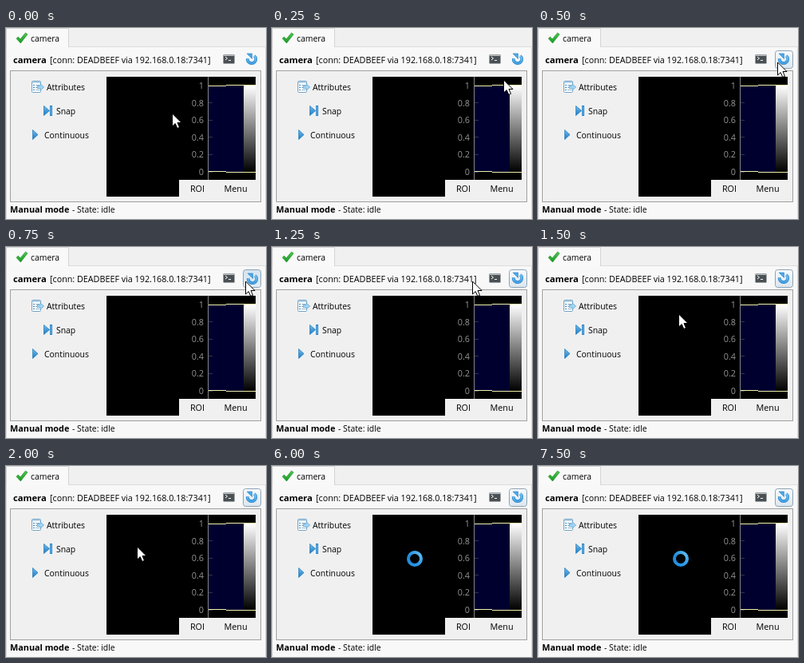
Animation, 326 px wide and 239 px high, one loop 8 s. Source, as an HTML page with a canvas:

```html
<!DOCTYPE html>
<html lang="en">
<head>
<meta charset="utf-8">
<title>Camera panel</title>
<style>
html, body { margin: 0; width: 100%; height: 100%; overflow: hidden; background: #f0f0f0; }
canvas { display: block; width: 326px; height: 239px; }
</style>
</head>
<body>
<canvas id="stage" width="326" height="239"></canvas>
<script>
const ctx = document.getElementById('stage').getContext('2d');
const LOOP = 8000;
const FONT = '"Open Sans", "Noto Sans", sans-serif';
const LABEL = { size: 10.4 };

// [start in ms, tip x, tip y]
const cursorStops = [
  [0, 208, 107], [250, 290, 65], [500, 300, 43], [1250, 251, 43],
  [1500, 176, 84], [1750, 165, 100], [2000, 164, 101]
];
const HOVER_AT = 500, PRESS_AT = 750, RELEASE_AT = 1250, BUSY_AT = 6000;

function rect(x, y, w, h, fill) {
  ctx.fillStyle = fill;
  ctx.fillRect(x, y, w, h);
}

function text(str, x, y, { size = 10.85, weight = 400, color = '#000', align = 'left' } = {}) {
  ctx.font = `${weight} ${size}px ${FONT}`;
  ctx.fillStyle = color;
  ctx.textAlign = align;
  ctx.fillText(str, x, y);
}

function path(points, { fill, stroke, width = 1, close = true } = {}) {
  ctx.beginPath();
  points.forEach(([x, y], i) => i ? ctx.lineTo(x, y) : ctx.moveTo(x, y));
  if (close) ctx.closePath();
  if (fill) { ctx.fillStyle = fill; ctx.fill(); }
  if (stroke) { ctx.strokeStyle = stroke; ctx.lineWidth = width; ctx.stroke(); }
}

function vertical(y0, y1, ...colors) {
  const g = ctx.createLinearGradient(0, y0, 0, y1);
  colors.forEach((c, i) => g.addColorStop(i / (colors.length - 1), c));
  return g;
}

function roundBox(x, y, w, h, r, fill, stroke) {
  ctx.beginPath();
  ctx.roundRect(x, y, w, h, r);
  ctx.fillStyle = fill;
  ctx.fill();
  ctx.strokeStyle = stroke;
  ctx.lineWidth = 1;
  ctx.stroke();
}

function drawTab() {
  rect(0, 23, 326, 216, '#f8f8f8');
  path([[0.5, 238.5], [0.5, 23.5], [325.5, 23.5], [325.5, 238.5]], { stroke: '#dcdcdc', close: false });
  rect(1, 1, 77, 23, '#f9f9f9');
  path([[0.5, 24], [0.5, 0.5], [78.5, 0.5], [78.5, 24]], { stroke: '#d4d4d4', close: false });
  path([[13, 13.2], [15.2, 11], [18, 13.8], [24.5, 6], [27, 8], [18.3, 19]],
    { fill: vertical(6, 19, '#53c653', '#159a22'), stroke: '#168a22', width: 0.6 });
  text('camera', 31, 17, LABEL);
}

function drawTerminal() {
  roundBox(272.5, 33.5, 14, 11, 1, '#4a5054', '#9da2a6');
  rect(273, 34, 13, 1, '#c0c4c7');
  path([[275, 36], [277.5, 38], [275, 40]], { stroke: '#fff', close: false });
  rect(279, 40, 3, 1, '#fff');
}

function drawRefresh(x, y) {
  ctx.beginPath();
  ctx.arc(x, y, 5.2, -0.9, Math.PI * 1.05);
  ctx.strokeStyle = '#2a84c8';
  ctx.lineWidth = 3.8;
  ctx.stroke();
  ctx.strokeStyle = vertical(y - 7, y + 7, '#86caf5', '#3a9be0');
  ctx.lineWidth = 2.6;
  ctx.stroke();
  path([[x - 6, y - 7], [x + 0.5, y - 7], [x + 0.5, y - 0.5]],
    { fill: '#4aa8e6', stroke: '#2a84c8', width: 0.6 });
}

function drawHeader(t) {
  text('camera', 9, 44, { size: 11.2, weight: 700 });
  text('[conn: DEADBEEF via 192.168.0.18:7341]', 55, 44, { size: 10.75 });
  drawTerminal();
  const pressed = t >= PRESS_AT && t < RELEASE_AT;
  if (t >= HOVER_AT) {
    const fill = pressed ? vertical(28, 51, '#d5e3ee', '#e3edf5')
      : vertical(28, 51, '#f8fafc', '#dce6ee');
    roundBox(297.5, 28.5, 22, 22, 3, fill, '#8da3b5');
  }
  drawRefresh(pressed ? 309 : 308, pressed ? 40 : 39);
}

function blueTriangle(x, y, w, h) {
  path([[x, y], [x + w, y + h / 2], [x, y + h]],
    { fill: vertical(y, y + h, '#75bdf0', '#1b79c2'), stroke: '#287fbd', width: 0.8 });
}

function drawActions() {
  roundBox(32.5, 66.5, 11, 14, 1, '#fff', '#6fa3c8');
  rect(33, 67, 10, 2, '#b5d3e8');
  for (let y = 71; y < 79; y += 3) {
    rect(34, y, 2, 1, '#3486c3');
    rect(37, y, 5, 1, '#9db0bd');
  }
  path([[39, 72.5], [43, 72.5], [43, 70], [47.5, 74], [43, 78], [43, 75.5], [39, 75.5]],
    { fill: '#a5d6f4', stroke: '#4b9ccf', width: 0.7 });
  text('Attributes', 51, 78, LABEL);
  blueTriangle(47.5, 97.5, 7, 12);
  rect(55, 97, 3, 13, '#2984c8');
  rect(56, 98, 1, 11, '#71b9e9');
  text('Snap', 63, 108, LABEL);
  blueTriangle(33.5, 127.5, 6.5, 12);
  text('Continuous', 48, 138, LABEL);
}

function drawLevel(y, barY) {
  const color = '#f0f0aa';
  rect(254, y, 22, 1, color);
  rect(276, barY, 37, 1, color);
}

function drawView() {
  rect(126, 61, 187, 150, '#000');
  rect(254, 72, 44, 108, '#00002f');
  rect(298, 72, 15, 108, vertical(72, 180, '#fff', '#000'));
  rect(253, 61, 1, 129, '#858585');
  for (let i = 0; i <= 5; i++) {
    const y = 72 + i * 21.6;
    const label = String((10 - i * 2) / 10);
    text(label, 248, y + 4, { color: '#969696', align: 'right' });
    rect(254, Math.floor(y), 5, 1, '#32324a');
  }
  drawLevel(72, 71);
  drawLevel(179, 180);
  rect(217, 190, 96, 21, '#f0f0f0');
  text('ROI', 240, 205, { align: 'center' });
  text('Menu', 288, 205, { align: 'center' });
}

function drawCursor(x, y) {
  ctx.save();
  ctx.translate(x + 0.5, y);
  path([[0, 0], [0, 16], [3.7, 12.6], [6.3, 18.5], [9, 17.3], [6.5, 11.5], [11.5, 11.5]],
    { fill: '#fff', stroke: '#000' });
  ctx.restore();
}

function drawBusy() {
  const ring = ctx.createConicGradient(-0.8, 179, 116);
  ring.addColorStop(0, '#58baf2');
  ring.addColorStop(0.35, '#2594e5');
  ring.addColorStop(0.7, '#208adb');
  ring.addColorStop(1, '#58baf2');
  ctx.beginPath();
  ctx.arc(179, 116, 8, 0, Math.PI * 2);
  ctx.strokeStyle = ring;
  ctx.lineWidth = 4;
  ctx.stroke();
}

function drawGroup() {
  rect(5, 53, 315, 165, '#f0f0f0');
  ctx.strokeStyle = '#a0a0a0';
  ctx.lineWidth = 1;
  ctx.strokeRect(5.5, 53.5, 314, 164);
}

function draw(t) {
  rect(0, 0, 326, 239, '#f0f0f0');
  drawTab();
  drawHeader(t);
  drawGroup();
  drawActions();
  drawView();
  text('Manual mode', 5, 231, { weight: 700 });
  text('- State: idle', 83, 231, LABEL);
  if (t >= BUSY_AT) {
    drawBusy();
  } else {
    const [, x, y] = cursorStops.filter(([start]) => start <= t).pop();
    drawCursor(x, y);
  }
}

const begin = performance.now();
function tick() {
  draw((performance.now() - begin) % LOOP);
  requestAnimationFrame(tick);
}
tick();
</script>
</body>
</html>
```
